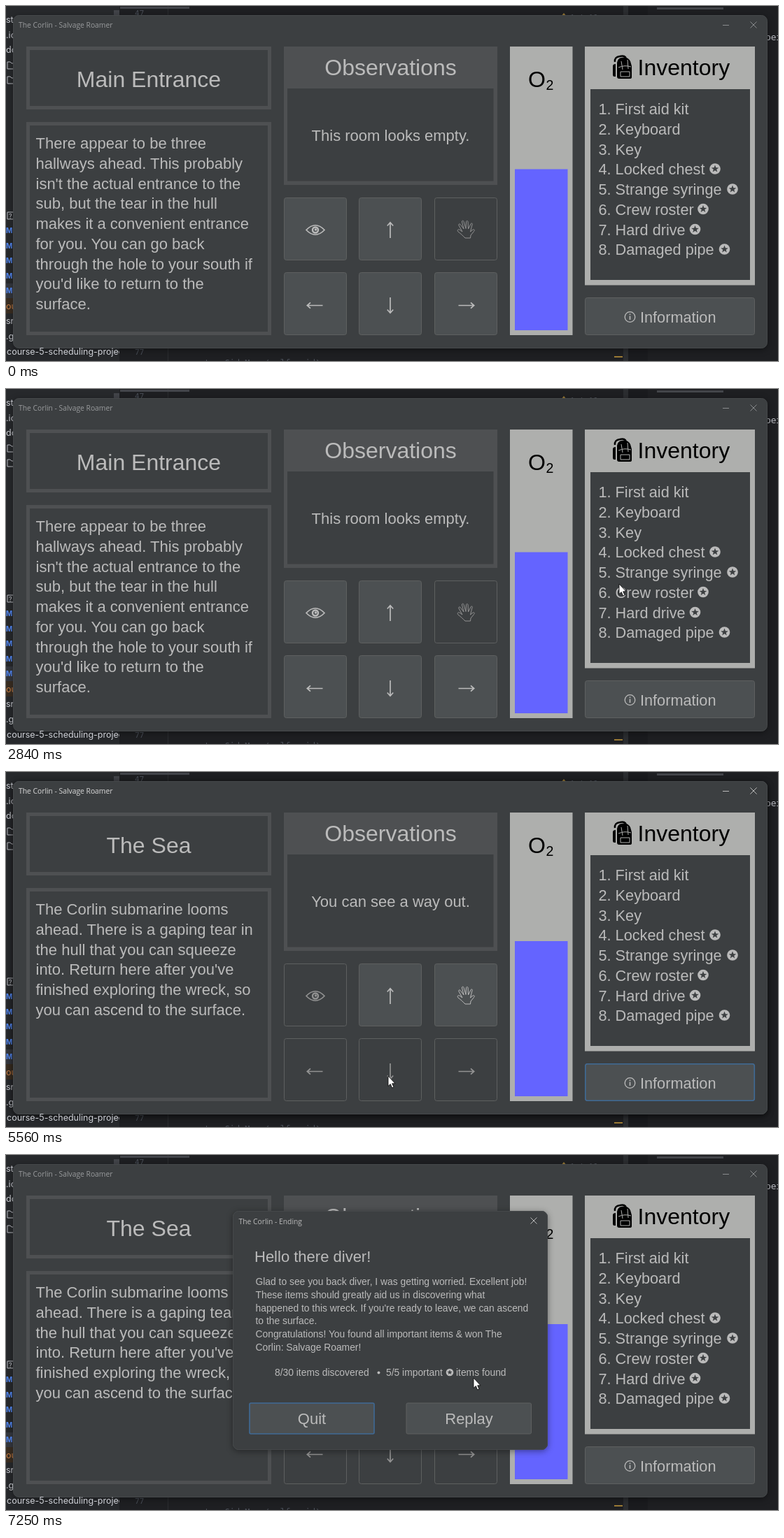
An HTML page that plays this animation: 1103 px wide and 508 px high, repeating every 8 s.

```html
<!DOCTYPE html>
<html lang="en">
<head>
<meta charset="utf-8">
<title>The Corlin</title>
<style>
html, body { margin: 0; width: 100%; height: 100%; overflow: hidden; background: #1e1f22; }
svg { display: block; width: 1103px; height: 508px; }
text { font-family: "Liberation Sans", Arial, sans-serif; font-size: 22px; fill: #bbb; }
.mid { text-anchor: middle; }
.big { font-size: 32px; }
.small { font-size: 13.85px; }
.list { font-size: 21.7px; }
.cap { font: 10.3px "Open Sans", "Noto Sans", sans-serif; }
.ide text { font: 12.5px Inter, sans-serif; fill: #ced0d6; }
.ide .mono { font: 11px "Noto Sans Mono", monospace; fill: #4b5059; }
.ide .md { font: bold 10px Inter, sans-serif; fill: #548af7; }
.black, .black text { fill: #000; }
.line { fill: none; stroke: currentColor; stroke-width: 1.7; }
.frame { fill: none; stroke: #4e5052; stroke-width: 5; }
.win { fill: #3c3f41; stroke: #45484a; }
.shade { filter: drop-shadow(0 2px 5px #0006); }
.face { fill: var(--f); stroke: var(--s); }
.on { --f: #4c5052; --s: #5e6060; color: #bbb; }
.off { --f: #3c3f41; --s: #5e6060; color: #929292; }
.hover { --f: #53575a; --s: #466d94; color: #bbb; }
.press { --f: #5c5f62; --s: #40688f; color: #bbb; }
.focus { --f: #4c5052; --s: #3f6a96; stroke-width: 1.6; }

.room, .sea, .infoHover, .infoFocus, .downHover, .downPress, .handHover, .handPress,
.click1, .click2, .active, .dialog, .settled { animation: 8s step-end infinite; }
.room { animation-name: room; }
.sea { animation-name: sea; }
.infoHover { animation-name: infoHover; }
.infoFocus { animation-name: infoFocus; }
.downHover { animation-name: downHover; }
.downPress, .click1 { animation-name: click1; }
.handHover { animation-name: handHover; }
.handPress, .click2 { animation-name: click2; }
.active { animation-name: active; }
.settled { animation-name: settled; }
.dialog { animation-name: dialog; transform-origin: 493px 205px; }
@keyframes room { 0% { visibility: visible } 63.75%, 100% { visibility: hidden } }
@keyframes sea { 0% { visibility: hidden } 63.75%, 100% { visibility: visible } }
@keyframes infoHover { 0%, 7%, 100% { visibility: hidden } 3.5% { visibility: visible } }
@keyframes infoFocus { 0%, 87.3%, 100% { visibility: hidden } 63.75% { visibility: visible } }
@keyframes downHover { 0%, 63%, 100% { visibility: hidden } 51.3% { visibility: visible } }
@keyframes click1 { 0%, 63.75%, 100% { visibility: hidden } 63% { visibility: visible } }
@keyframes handHover { 0%, 87.3%, 100% { visibility: hidden } 71.4% { visibility: visible } }
@keyframes click2 { 0%, 87.3%, 100% { visibility: hidden } 85.6% { visibility: visible } }
@keyframes active { 0%, 87.3%, 100% { visibility: hidden } 63% { visibility: visible } }
@keyframes settled { 0% { visibility: hidden } 89%, 100% { visibility: visible } }
@keyframes dialog {
  0% { visibility: hidden; opacity: 0; transform: scale(.9) }
  87.3% { visibility: visible; opacity: .3; transform: scale(.915) }
  88.3% { visibility: visible; opacity: .77; transform: scale(.941) }
  89% { visibility: visible; opacity: .92; transform: scale(.97) }
  89.8% { visibility: visible; opacity: 1; transform: scale(.99) }
  90.6%, 100% { visibility: visible; opacity: 1; transform: none }
}
</style>
</head>
<body>
<svg viewBox="0 0 1103 508">
  <defs>
    <clipPath id="tree"><path d="M0 0H162V508H0Z"/></clipPath>
    <rect id="btn" class="face" x=".5" y=".5" width="89" height="89" rx="3"/>
    <g id="eye">
      <use href="#btn"/>
      <path class="line" d="M32 46.500Q45 33 58 46.500Q45 60 32 46.500Z"/>
      <circle cx="45" cy="46.500" r="4" fill="none" stroke="currentColor" stroke-width="2.400"/>
      <circle cx="45.500" cy="46" r="1.800" fill="currentColor"/>
    </g>
    <path id="shaft" class="line" d="M45 58V36M40.800 40.500L45 35.800L49.200 40.500"/>
    <g id="up"><use href="#btn"/><use href="#shaft"/></g>
    <g id="down"><use href="#btn"/><use href="#shaft" transform="rotate(180 45 47)"/></g>
    <g id="left"><use href="#btn"/><use href="#shaft" transform="rotate(-90 45 47.500)"/></g>
    <g id="right"><use href="#btn"/><use href="#shaft" transform="rotate(90 45 47.500)"/></g>
    <g id="hand">
      <use href="#btn"/>
      <path class="line" stroke-linejoin="round" style="stroke-width:1" transform="translate(45 46)" d="M-1 12C-4 9-7 6-11 3C-13 1-11-1-9 0L-5 3L-10-6C-11-8-8.500-9-7.500-7L-3-1L-5.500-11C-6-13-3.500-13.500-3-11.500L0-1.500L.5-11C.5-13 3-13 3-11L3.500-1L7-8C8-10 10-9 9-7L6.500 3L10 0C12-1 13 1 11.500 2.500L7 8L6.500 12Z"/>
    </g>
    <g id="star">
      <circle r="7.800" fill="#bbb"/>
      <path fill="#3c3f41" d="M0-5.500L1.400-1.700L5.300-1.600L2.200.8L3.300 4.500L0 2.300L-3.300 4.500L-2.200.8L-5.300-1.600L-1.400-1.700Z"/>
    </g>
    <path id="cross" d="M-4.500-4.500L4.500 4.500M4.500-4.500L-4.500 4.500"/>
  </defs>

  <!-- editor behind the window -->
  <g class="ide">
    <path fill="#1e1f22" d="M0 0H1103V508H0Z"/>
    <path fill="#27292c" d="M0 0H162V508H0Z"/>
    <path fill="#2b2d30" d="M882 0h7V508h-7ZM231 0h1V508h-1Z"/>
    <path fill="#1a1b1e" d="M889 0h28V508h-28Z"/>
    <path fill="#43454a" d="M154 6h8v8h-8ZM163 1h99v3h-99ZM930 2h95v3h-95Z"/>
    <path fill="#35383f" d="M0 397h12v21H0Z"/>
    <path fill="#3a2e22" d="M0 418h12v22H0Z"/>
    <path fill="#9a7a35" d="M869 501h12v2h-12ZM797 10l4 5h-8Z"/>
    <text x="0" y="24">st</text>
    <text x="0" y="46">.ic</text>
    <text x="0" y="67">dc</text>
    <path d="M2 80h4l2 2h6v8H2ZM2 101h4l2 2h6v8H2ZM2 295h9v10H2Z" fill="none" stroke="#bcbec4"/>
    <text x="4" y="304" style="font-size:9px">?</text>
    <text class="md" data-dy="21.600" x="0" y="325">M|M|M|M|M</text>
    <text x="0" y="434" style="fill:#c77d45">ou</text>
    <text x="0" y="455">sr</text>
    <text x="0" y="477">.g</text>
    <text class="mono" x="184" y="14">47</text>
    <text class="mono" x="184" y="499">77</text>
    <text class="mono" x="806" y="20">1 ^ 10</text>
    <text class="mono" x="262" y="515" style="font-size:12px">root = SideMenu(self.grid)</text>
    <text class="mono" x="1085" y="49" style="font-size:13px;fill:#bcbec4">per</text>
  </g>

  <!-- main window -->
  <rect class="win shade" x="10.500" y="13.500" width="1077" height="476" rx="8"/>
  <rect class="win shade active" x="10.500" y="13.500" width="1077" height="476" rx="8"/>
  <g class="ide"><text x="1" y="498.500" clip-path="url(#tree)">course-5-scheduling-projects</text></g>
  <g stroke="#8a8c8e" fill="none"><path d="M1024 27.500h9"/><use href="#cross" x="1068" y="27"/></g>
  <text class="cap" x="18" y="31" style="fill:#999b9d">The Corlin - Salvage Roamer</text>
  <g class="active">
    <g stroke="#bbb" fill="none"><path d="M1024 27.500h9"/><use href="#cross" x="1068" y="27"/></g>
    <text class="cap" x="18" y="31">The Corlin - Salvage Roamer</text>
  </g>

  <rect class="frame" x="31.500" y="60.500" width="345" height="85"/>
  <rect class="frame" x="31.500" y="168.500" width="345" height="300"/>
  <path fill="#4e5052" d="M397 58H702V256H397Z"/>
  <path fill="#3c3f41" d="M402 118H696.500V250.500H402Z"/>
  <text class="big mid" x="549.500" y="98.500">Observations</text>

  <path fill="#aeafad" d="M720 58H809.500V471H720ZM827 58H1070V399.500H827Z"/>
  <path fill="#3c3f41" d="M835 119H1063V392H835Z"/>
  <g class="black">
    <text class="big" x="746" y="116">O</text>
    <text x="771.500" y="120" style="font-size:19.500px">2</text>
    <text class="big" x="902.500" y="98.500">Inventory</text>
    <path d="M873 81Q874 75 879 74Q888 72 892 79L894 86V102Q894 104 891 104H876Q873 104 873 101ZM867 86Q867 83 871 83V101H869Q867 101 867 98Z"/>
    <path d="M870 80Q869 73 877 72Q885 70 886 76" fill="none" stroke="#000" stroke-width="2.500"/>
    <path d="M872 84V102M875 88Q884 84 893 87M879 79L881 91M888 77L889 90M878 94H891V101H878Z" fill="none" stroke="#aeafad"/>
  </g>
  <text class="list" data-dy="28.750" x="846.500" y="155">1. First aid kit|2. Keyboard|3. Key|4. Locked chest|5. Strange syringe|6. Crew roster|7. Hard drive|8. Damaged pipe</text>
  <use href="#star" x="1013" y="233"/>
  <use href="#star" x="1038" y="262"/>
  <use href="#star" x="996" y="290.500"/>
  <use href="#star" x="984.500" y="319.500"/>
  <use href="#star" x="1026.500" y="348"/>

  <g id="info">
    <rect class="face on" x="827.500" y="417.500" width="242" height="53" rx="3"/>
    <rect class="face hover infoHover" x="827.500" y="417.500" width="242" height="53" rx="3"/>
    <rect class="face focus infoFocus" x="827.800" y="417.800" width="241.500" height="52.500" rx="3"/>
    <circle cx="891.500" cy="445" r="7.300" fill="none" stroke="#bbb" stroke-width="1.300"/>
    <path d="M891.500 443.500V449M891.500 440.500v1.600" stroke="#bbb" stroke-width="1.600"/>
    <text x="906" y="452.500" class="list">Information</text>
  </g>

  <g class="room">
    <text class="big mid" x="204" y="116">Main Entrance</text>
    <text data-dy="28.750" x="42.500" y="204">There appear to be three|hallways ahead. This probably|isn't the actual entrance to the|sub, but the tear in the hull|makes it a convenient entrance|for you. You can go back|through the hole to your south if|you'd like to return to the|surface.</text>
    <text class="mid" x="549.500" y="193">This room looks empty.</text>
    <path fill="#6464ff" d="M727 233.500H802.500V464H727Z"/>
    <use href="#eye" class="on" x="397" y="274"/>
    <use href="#up" class="on" x="504" y="274"/>
    <use href="#hand" class="off" x="612" y="274"/>
    <use href="#left" class="on" x="397" y="381"/>
    <use href="#down" class="on" x="504" y="381"/>
    <use href="#right" class="on" x="612" y="381"/>
  </g>
  <use href="#down" class="hover downHover" x="504" y="381"/>
  <use href="#down" class="press downPress" x="504" y="381"/>

  <g class="sea">
    <text class="big mid" x="204" y="116">The Sea</text>
    <text data-dy="28.750" x="42.500" y="204">The Corlin submarine looms|ahead. There is a gaping tear in|the hull that you can squeeze|into. Return here after you've|finished exploring the wreck, so|you can ascend to the surface.</text>
    <text class="mid" x="549.500" y="193">You can see a way out.</text>
    <path fill="#6464ff" d="M727 242H802.500V464H727Z"/>
    <use href="#eye" class="off" x="397" y="274"/>
    <use href="#up" class="on" x="504" y="274"/>
    <use href="#hand" class="on" x="612" y="274"/>
    <use href="#left" class="off" x="397" y="381"/>
    <use href="#down" class="off" x="504" y="381"/>
    <use href="#right" class="off" x="612" y="381"/>
  </g>
  <use href="#hand" class="hover handHover" x="612" y="274"/>
  <use href="#hand" class="press handPress" x="612" y="274"/>

  <!-- ending dialog -->
  <g class="dialog">
    <rect class="win shade settled" x="324.500" y="80.500" width="449" height="341" rx="8"/>
    <rect class="win" x="324.500" y="80.500" width="449" height="341" rx="8"/>
    <text class="cap" x="332.500" y="98.500">The Corlin - Ending</text>
    <use href="#cross" x="754" y="94" stroke="#bbb"/>
    <text x="355" y="153">Hello there diver!</text>
    <text class="small" data-dy="18.800" x="356.500" y="186">Glad to see you back diver, I was getting worried. Excellent job!|These items should greatly aid us in discovering what|happened to this wreck. If you're ready to leave, we can ascend|to the surface.|Congratulations! You found all important items &amp; won The|Corlin: Salvage Roamer!</text>
    <text class="small" x="384" y="316">8/30 items discovered</text>
    <circle cx="532.500" cy="311.500" r="2" fill="#bbb"/>
    <text class="small" x="543" y="316">5/5 important</text>
    <use href="#star" transform="translate(634 311) scale(.68)"/>
    <text class="small" x="643" y="316">items found</text>
    <rect class="face focus" x="348" y="355" width="178" height="44" rx="2"/>
    <rect class="face on" x="572" y="355" width="178.500" height="44" rx="2"/>
    <text class="mid" x="437" y="385">Quit</text>
    <text class="mid" x="661.500" y="385">Replay</text>
  </g>

  <circle class="click1" cx="545" cy="434.500" r="11" fill="#b9b41fd9"/>
  <circle class="click2" cx="667" cy="318.500" r="11" fill="#b9b41fd9"/>
  <path id="cursor" visibility="hidden" d="M0 0V14.500L3.300 11.500L5.600 17L8 16L5.700 10.800H10Z" fill="#fff" stroke="#000" stroke-width=".8"/>
</svg>
<script>
const NS = "http://www.w3.org/2000/svg";
for (const el of document.querySelectorAll("text[data-dy]")) {
  const rows = el.textContent.split("|");
  el.textContent = "";
  rows.forEach((row, i) => {
    const span = document.createElementNS(NS, "tspan");
    span.setAttribute("x", el.getAttribute("x"));
    if (i) span.setAttribute("dy", el.dataset.dy);
    span.textContent = row;
    el.append(span);
  });
}

// pointer path: time, x, y
const path = [
  [210, 985, 492], [330, 1025, 440], [480, 1068, 372], [650, 1077, 320], [990, 1056, 243],
  [1120, 1035, 208], [1240, 985, 187], [1390, 918, 225], [1500, 890, 290], [1620, 925, 365],
  [1700, 985, 378], [1790, 1050, 330], [1860, 1058, 265], [1960, 1010, 192], [2080, 900, 195],
  [2200, 793, 270], [2330, 840, 345], [2430, 930, 372], [2530, 1040, 325], [2630, 1035, 215],
  [2700, 975, 172], [2838, 876, 279], [2960, 925, 365], [3040, 975, 371], [3210, 1056, 265],
  [3400, 1056, 265], [3700, 900, 330], [3950, 700, 395], [4230, 547, 433], [4420, 546, 435],
  [5500, 546, 435], [5700, 610, 360], [5830, 668, 322], [5900, 681, 319], [6040, 681, 319],
  [6230, 668, 319]
];
const LOOP = 8000, TICK = 1000 / 15, PHASE = 38;
const cursor = document.getElementById("cursor");

// slope at a point; zero next to a pause
function slope(i, k) {
  const a = path[i - 1], b = path[i], c = path[i + 1];
  if (!a || !c || a[k] === b[k] || b[k] === c[k]) return 0;
  return (c[k] - a[k]) / (c[0] - a[0]);
}

function pointAt(t, k) {
  const j = path.findIndex(p => p[0] > t);
  if (j < 0) return path[path.length - 1][k];
  if (j === 0) return path[0][k];
  const a = path[j - 1], b = path[j], d = b[0] - a[0], u = (t - a[0]) / d, v = 1 - u;
  return v * v * ((1 + 2 * u) * a[k] + u * d * slope(j - 1, k)) +
         u * u * ((3 - 2 * u) * b[k] - v * d * slope(j, k));
}

let start;
function draw(now) {
  start ??= now;
  const t = (now - start) % LOOP;
  const held = Math.floor((t - PHASE) / TICK) * TICK + PHASE;
  const x = Math.round(pointAt(held, 1)), y = Math.round(pointAt(held, 2));
  cursor.setAttribute("transform", `translate(${x} ${y})`);
  cursor.setAttribute("visibility", t < 210 ? "hidden" : "visible");
  requestAnimationFrame(draw);
}
requestAnimationFrame(draw);
</script>
</body>
</html>
```
